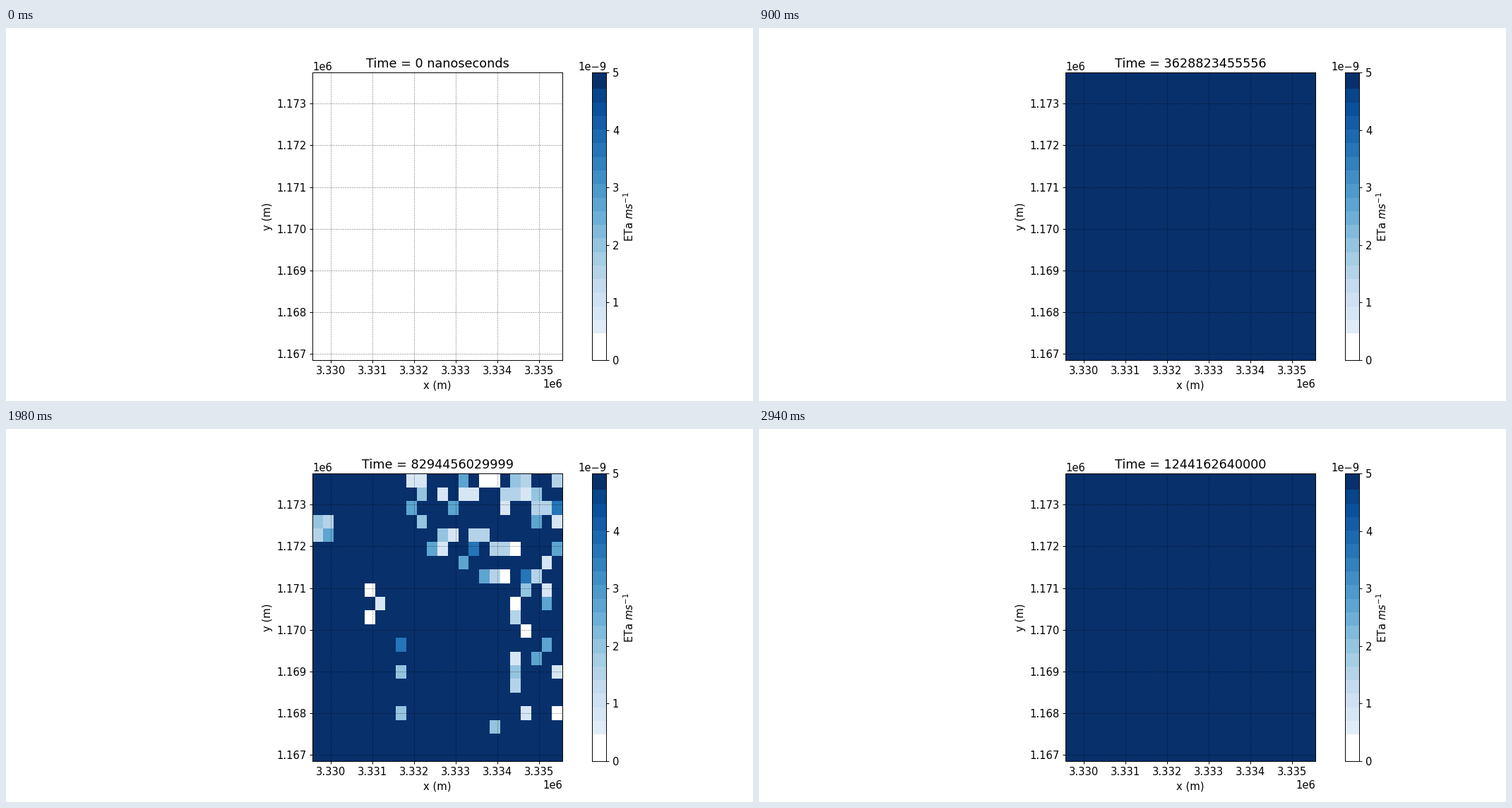
Animation, 1058 px wide and 529 px high, one loop 3000 ms. Source, as a matplotlib script:

```python
import numpy as np
import matplotlib.pyplot as plt
from matplotlib.animation import FuncAnimation
from matplotlib.colors import BoundaryNorm, ListedColormap

W, H, DPI = 1058, 529, 88.1667
FRAMES, STEP = 50, 60
ROWS, COLS = 21, 24
X0, Y0, CELL_X = 3329565, 1166851, 250
CELL_Y = 6890 / ROWS
FULL = 9.0  # well above the colour scale
DAY = 86400

# Isolated dry hollows: row, column, height, width
HOLLOWS = [(9, 5.2, 1.6, .9), (3.5, .5, .9, .9), (13.5, 7.2, .9, 1),
           (17.5, 8.2, .9, .9), (17, 17, 1.2, .7), (12, 7.5, .5, .8)]

rng = np.random.default_rng(7)
row, col = np.mgrid[:ROWS, :COLS]


def bump(r, c, size):
    return np.exp(-((row - r) ** 2 + (col - c) ** 2) / (2 * size ** 2))


def pick(levels, weights):
    return rng.choice(levels, (ROWS, COLS), p=weights)


def ridge():
    """Cells of the dry upland, whose left edge shifts right going down."""
    edge = 8 + 11 / (1 + np.exp((6.5 - row) / 1.3))
    return (col >= edge) & (row < 19)


def hollows():
    inside = np.zeros((ROWS, COLS), bool)
    for r, c, h, w in HOLLOWS:
        inside |= ((row - r) / h) ** 2 + ((col - c) / w) ** 2 <= 1
    return inside


def early_field():
    f = 4.1 + .4 * bump(12, 14, 4) + .15 * bump(2, 3, 4)
    f += .3 * bump(9, 10, 2) - .75 * bump(14, 3, 1.4) - .9 * bump(7, 12.5, 1)
    f += rng.normal(0, .1, f.shape)

    # Wet patches run along rows, so blend the noise sideways
    noise = rng.normal(size=f.shape)
    noise += .6 * np.roll(noise, 1, axis=1)
    up, low = ridge(), hollows()
    dry = pick([0, .7, 1.5, 2.3, 3.2], [.55, .2, .1, .1, .05])
    f[up] = np.where(noise > 0, FULL, dry)[up]

    rim = np.roll(low, (1, 1), (0, 1)) | np.roll(low, 1, axis=1)
    f[rim & ~up] = FULL
    f[low] = dry[low]
    return f


def late_field(f):
    stays = (f < 3.5) & (ridge() | hollows()) & (rng.random(f.shape) < .55)
    levels = pick([0, .7, 1.5, 2.1, 2.6, 3.6], [.1, .2, .22, .22, .18, .08])
    return np.where(stays, levels, FULL)


early = early_field()
late = late_field(early)


def field_at(k):
    """Two dry spells on a wet season, with no evaporation every 8th step."""
    if k % 8 == 0:
        return np.zeros((ROWS, COLS))
    f = np.minimum(early + 1.2 * abs(k - 11), late + .8 * abs(k - 33))
    return np.clip(f, 0, 4.99)


def title_at(k):
    drift = np.interp(k, [5, 11, 20, 33, 40, 49],
                      [72.91, 25.98, 20.3, 56.029999, 12.4, 26.4])
    ns = (k - 1) * 3 * DAY * 10 ** 9 + round(drift * 1e6) * 1000
    return f"Time = {ns if k else 0} nanoseconds"[:20]


edges = np.array([0, *np.linspace(.46, 4.72, 19), 5])
mids = (edges[:-1] + edges[1:]) / 2
blues = plt.get_cmap("Blues")
colors = blues(mids / 5)
colors[0], colors[-1] = 1, blues(1.0)
style = dict(cmap=ListedColormap(colors),
             norm=BoundaryNorm(edges, len(mids)))

plt.rcParams.update({"font.family": "DejaVu Sans", "font.size": 12})
fig = plt.figure(figsize=(12, 6), dpi=DPI, facecolor="white")
ax = fig.add_axes([434.2 / W, .11, 354 / W, .77])
cax = fig.add_axes([830 / W, .11, 20.2 / W, .77])

xs = X0 + CELL_X * np.arange(COLS + 1)
ys = Y0 + CELL_Y * np.arange(ROWS + 1)
mesh = ax.pcolormesh(xs, ys, field_at(0)[::-1], **style)
ax.set(xlim=(xs[0], xs[-1]), ylim=(ys[0], ys[-1]),
       xticks=np.arange(3330000, 3335001, 1000),
       yticks=np.arange(1167000, 1173001, 1000),
       xlabel="x (m)", ylabel="y (m)")
ax.grid(color="black", alpha=.5, linestyle="--", linewidth=.5)
title = ax.set_title(title_at(0))

cax.pcolormesh([0, 1], edges * 1e-9, mids[:, None], **style)
cax.set(xlim=(0, 1), ylim=(0, 5e-9), xticks=[], yticks=np.arange(6) * 1e-9)
cax.yaxis.tick_right()
cax.yaxis.set_label_position("right")
cax.yaxis.set_offset_position("right")
cax.set_ylabel("ETa $ms^{-1}$")


def draw(k):
    mesh.set_array(field_at(k)[::-1])
    title.set_text(title_at(k))
    return mesh, title


anim = FuncAnimation(fig, draw, frames=FRAMES, interval=STEP, repeat=True,
                     repeat_delay=0, blit=False)
plt.show()
```
